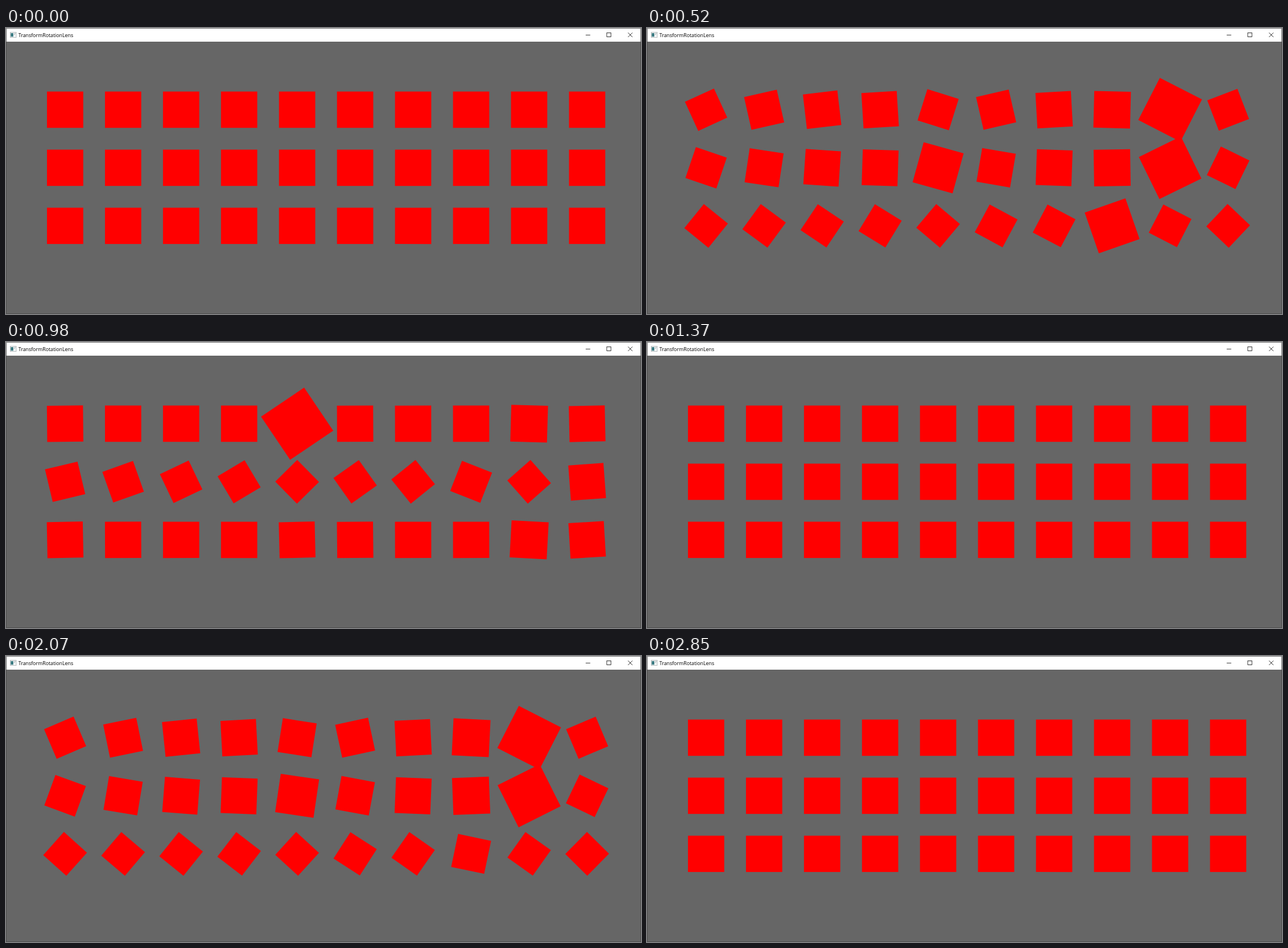
These frames come from a looping animation (1116 px wide and 502 px high, 2920 ms). An HTML page:

```html
<!DOCTYPE html>
<html lang="en">
<head>
<meta charset="utf-8">
<title>TransformRotationLens</title>
<style>
  html, body { margin: 0; width: 100%; height: 100%; overflow: hidden; background: #666; }
  svg { display: block; }
  text { font: 8.8px "Open Sans", "Noto Sans", sans-serif; }
</style>
</head>
<body>
<svg width="1116" height="502" viewBox="0 0 1116 502">
  <rect width="1116" height="502" fill="#666"/>
  <g id="squares" fill="#f00"></g>
  <path d="M.5 24V501.5H1115.5V24" fill="none" stroke="#4c4c4c"/>
  <rect width="1116" height="24" fill="#fff"/>
  <path d="M.5 24V.5H1115.5V24" fill="none" stroke="#6a6a6a"/>
  <g>
    <rect x="7.4" y="7.4" width="10.6" height="9" fill="#f6f8f8" stroke="#a3abad" stroke-width=".8"/>
    <rect x="8.4" y="9" width="4.4" height="6.2" fill="#35777f"/>
    <path d="M14.2 9.5H17M14.2 11.5H16" stroke="#8d9699" stroke-width=".8"/>
  </g>
  <text x="21.8" y="15.9">TransformRotationLens</text>
  <g fill="none" stroke="#000" stroke-width=".8">
    <path d="M1018.8 12.4H1026.8"/>
    <rect x="1055.9" y="8.4" width="7.2" height="7.2"/>
    <path d="M1093.2 8.2L1101 16M1101 8.2L1093.2 16"/>
  </g>
</svg>
<script>
const LOOP = 2920, TICK = 77.42, FIRST_TICK = 127;
const SIZE = 63.72, PITCH = 101.94, LEFT = 103.88, TOP = 143.4;
const { PI, SQRT1_2, sin, cos, sqrt, floor } = Math;

// Tween progress at a few ticks: swing back, pause, swing forth
const keys = [
  [-1, 1], [0, .98], [5, .5327], [11, .0825], [12.1, 0],
  [18.4, 0], [21, .2], [25, .517], [30, .902], [31.3, 1]
];

function progressAt(time) {
  const tick = floor((time - FIRST_TICK) / TICK);
  const next = keys.findIndex(([at]) => at > tick);
  if (next < 1) return 1;
  const [[t0, p0], [t1, p1]] = keys.slice(next - 1);
  return p0 + (p1 - p0) * (tick - t0) / (t1 - t0);
}

function bounceOut(t) {
  if (t < 4 / 11) return 121 / 16 * t * t;
  if (t < 8 / 11) return 363 / 40 * t * t - 9.9 * t + 3.4;
  if (t < .9) return 4356 / 361 * t * t - 35442 / 1805 * t + 16061 / 1805;
  return 10.8 * t * t - 20.52 * t + 10.72;
}

// Returns the in, out and in-out variants of an easing
function family(easeIn,
                easeOut = t => 1 - easeIn(1 - t),
                easeInOut = t => t < .5 ? easeIn(2 * t) / 2 : .5 + easeOut(2 * t - 1) / 2) {
  return [easeIn, easeOut, easeInOut];
}

const families = [
  ...[2, 3, 4, 5].map(n => family(t => t ** n)),
  family(t => 1 + sin(2 * PI * t), t => sin(2 * PI * t), t => (1 - cos(PI * t)) / 2),
  family(t => 1 - sqrt(1 - t * t)),
  family(t => 2 ** (10 * (t - 1))),
  family(t => sin(26 * PI * t) * 2 ** (10 * (t - 1)), t => 1 - sin(26 * PI * t) * 2 ** (-10 * t)),
  family(t => t ** 3 - t * sin(PI * t)),
  family(t => 1 - bounceOut(1 - t), bounceOut)
];

const group = document.getElementById("squares");
const squares = families.flatMap((eases, col) => eases.map((ease, row) => {
  const node = document.createElementNS(group.namespaceURI, "rect");
  const box = { x: -SIZE / 2, y: -SIZE / 2, width: SIZE, height: SIZE };
  for (const name in box) node.setAttribute(name, box[name]);
  group.append(node);
  return { node, ease, x: LEFT + col * PITCH, y: TOP + row * PITCH };
}));

// Unnormalised quaternion lerp over a quarter turn, so the size changes with the angle
function place({ node, ease, x, y }, progress) {
  const p = ease(progress);
  const w = 1 + (SQRT1_2 - 1) * p, z = SQRT1_2 * p;
  const a = w * w - z * z, b = 2 * w * z;
  const matrix = [a, -b, b, a, x, y].map(v => v.toFixed(4));
  node.setAttribute("transform", `matrix(${matrix})`);
}

const start = performance.now();

function draw() {
  const progress = progressAt((performance.now() - start) % LOOP);
  for (const square of squares) place(square, progress);
  requestAnimationFrame(draw);
}
draw();
</script>
</body>
</html>
```
